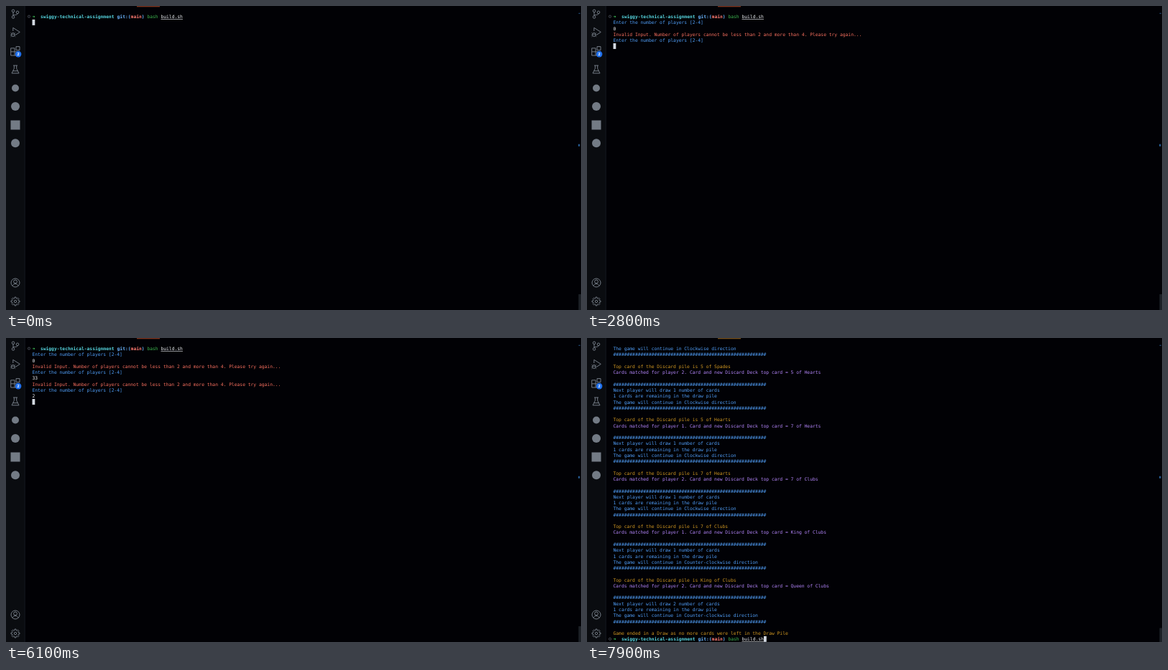
Recreate the animation shown at these times as an HTML page. Size 800x424 px, loop 8000 ms.

```html
<!DOCTYPE html>
<html lang="en">
<head>
<meta charset="utf-8">
<title>Card game in a terminal</title>
<style>
  html, body { margin: 0; width: 100%; height: 100%; overflow: hidden; background: #010105; }
  svg { display: block; width: 800px; height: 424px; }
  text { font: 6.325px "DejaVu Sans Mono", monospace; white-space: pre; text-rendering: geometricPrecision; }
  .blue { fill: #519ff8; }
  .red { fill: #f8705f; }
  .yellow { fill: #d29922; }
  .purple { fill: #b486fa; }
  .white { fill: #f0f3f6; }
  .green { fill: #3fb950; }
  .arrow { fill: #4ae168; font-weight: bold; }
  .path { fill: #56d4dd; font-weight: bold; }
  .git { fill: #6cb6ff; font-weight: bold; }
  .branch { fill: #ff7b72; font-weight: bold; }
  .icons { fill: none; stroke: #737b85; stroke-width: 1; stroke-linejoin: round; }
  .plain { fill: #737b85; stroke: none; }
</style>
</head>
<body>
<svg viewBox="0 0 800 424">
  <rect width="800" height="424" fill="#010105"/>
  <rect width="26" height="424" fill="#0a0c10"/>
  <path d="M26.2 0V424" stroke="#1b1f26" stroke-width=".8"/>
  <rect id="tab" x="182" width="32" height="1.3"/>

  <g class="icons">
    <circle cx="10" cy="6.8" r="1.8"/>
    <circle cx="10" cy="15.4" r="1.8"/>
    <circle cx="16" cy="8.8" r="1.8"/>
    <path d="M10 8.6V13.6M16 10.6C16 12.6 13 12.2 10 12.8"/>

    <path d="M9.8 35V30.3L19.3 36.4L13.2 40.4"/>
    <ellipse cx="9.8" cy="40" rx="2.1" ry="2.6"/>
    <path d="M7.7 39.3H11.9M6.4 37.3L8 38.6M13.2 37.3L11.6 38.6M6 40.5H7.7M11.9 40.5H13.6M6.4 43L8 41.8M13.2 43L11.6 41.8" stroke-width=".7"/>

    <path d="M6.7 58.8H12V69H6.7ZM6.7 63.8H17V69H12M14 56.6H19V61.6H14Z"/>

    <path d="M10 83H16M11.3 83V87.3L8 93.8H18L14.7 87.3V83M9.7 90.6H16.3"/>

    <circle cx="13" cy="386" r="6"/>
    <circle cx="13" cy="384.4" r="2.4"/>
    <path d="M9 390.4C10 386.6 16 386.6 17 390.4"/>

    <circle cx="13" cy="412" r="1.7"/>
    <path id="gear"/>

    <circle class="plain" cx="13" cy="114.5" r="5"/>
    <circle class="plain" cx="13" cy="140" r="6"/>
    <rect class="plain" x="6.5" y="159.5" width="13" height="13"/>
    <circle class="plain" cx="13" cy="191.3" r="6"/>
  </g>
  <circle cx="17.1" cy="67.1" r="4.3" fill="#1f6feb"/>
  <text x="17.1" y="69.2" fill="#fff" text-anchor="middle" style="font: bold 5.6px 'Liberation Sans', sans-serif">2</text>

  <rect x="796.5" y="9.8" width="2.5" height="1" fill="#24507f"/>
  <rect x="796.3" y="192.7" width="2" height="3" fill="#2b68a8"/>
  <rect id="slider" x="796.5" width="3.5" height="22" fill="#1c2026"/>

  <g id="screen"></g>
  <rect id="cursor" width="3.8" height="8" fill="#d3d9e2"/>
</svg>
<script>
const LOOP = 8000, LEFT = 36.5, TOP = 10.6, CHAR = 3.808, LINE = 8.27;
const $ = id => document.getElementById(id);

const row = (text, color) => [[text, color]];
const blank = [];
const ask = row('Enter the number of players [2-4]', 'blue');
const invalid = row('Invalid Input. Number of players cannot be less than 2 and more than 4. Please try again...', 'red');
const typed = text => row(text, 'white');
const hashes = row('#'.repeat(56), 'blue');
const direction = way => row(`The game will continue in ${way} direction`, 'blue');
const prompt = [['➜', 'arrow'], ['  ', ''], ['swiggy-technical-assignment', 'path'], [' ', ''],
  ['git:(', 'git'], ['main', 'branch'], [')', 'git'], [' ', '']];
const command = [...prompt, ['bash', 'green'], [' ', ''], ['build.sh', 'white', true]];

const turn = (top, player, next, draw, way) => [
  blank,
  row(`Top card of the Discard pile is ${top}`, 'yellow'),
  row(`Cards matched for player ${player}. Card and new Discard Deck top card = ${next}`, 'purple'),
  blank,
  hashes,
  row(`Next player will draw ${draw} number of cards`, 'blue'),
  row('1 cards are remaining in the draw pile', 'blue'),
  direction(way),
  hashes,
];

const start = [command, ask];
const retry = [...start, typed('0'), invalid, ask];
const lastTry = [...retry, typed('33'), invalid, ask];
const result = [
  direction('Clockwise'),
  hashes,
  ...turn('5 of Spades', 2, '5 of Hearts', 1, 'Clockwise'),
  ...turn('5 of Hearts', 1, '7 of Hearts', 1, 'Clockwise'),
  ...turn('7 of Hearts', 2, '7 of Clubs', 1, 'Clockwise'),
  ...turn('7 of Clubs', 1, 'King of Clubs', 1, 'Counter-clockwise'),
  ...turn('King of Clubs', 2, 'Queen of Clubs', 2, 'Counter-clockwise'),
  blank,
  row('Game ended in a Draw as no more cards were left in the Draw Pile', 'yellow'),
];

// Each state starts at its time; the cursor follows the last row.
const states = [
  [0, [command, blank]],
  [100, [...start, blank]],
  [2000, [...start, typed('0')]],
  [2500, [...retry, blank]],
  [3600, [...retry, typed('3')]],
  [3800, [...retry, typed('33')]],
  [4600, [...lastTry, blank]],
  [5500, [...lastTry, typed('2')]],
  [6060, [...lastTry, typed('2'), blank]],
  [6190, [...result, blank]],
  [6300, [...result, prompt]],
  [7100, [...result, command]],
];

function drawRow(spans, index) {
  const top = TOP + index * LINE;
  let x = LEFT, out = '';
  if (spans.length > 5)
    out += `<circle cx="32" cy="${top + 4}" r="1.6" fill="none" stroke="#6e7681" stroke-width=".6"/>`;
  for (const [text, color, underlined] of spans) {
    const width = text.length * CHAR;
    if (text.trim()) out += `<text class="${color}" x="${x}" y="${top + 6.5}">${text}</text>`;
    if (underlined)
      out += `<rect class="${color}" x="${x}" y="${top + 7.5}" width="${width}" height=".6"/>`;
    x += width;
  }
  return out;
}

function showState(rows) {
  const finished = rows.length > 20;
  const last = rows.length - 1;
  const columns = rows[last].reduce((sum, [text]) => sum + text.length, 0);
  $('screen').innerHTML = rows.map(drawRow).join('');
  $('cursor').setAttribute('x', LEFT + columns * CHAR);
  $('cursor').setAttribute('y', TOP + last * LINE);
  $('slider').setAttribute('y', finished ? 404.5 : 402);
  $('tab').setAttribute('fill', finished ? '#77521d' : '#80351f');
}

function gearPath() {
  const points = [];
  for (let tooth = 0; tooth < 8; tooth++)
    for (const [offset, radius] of [[-.26, 4.4], [-.17, 6], [.17, 6], [.26, 4.4]]) {
      const angle = tooth * Math.PI / 4 + offset;
      points.push(`${13 + radius * Math.cos(angle)} ${412 + radius * Math.sin(angle)}`);
    }
  return `M${points.join('L')}Z`;
}
$('gear').setAttribute('d', gearPath());

let shown;
function frame() {
  const time = performance.now() % LOOP;
  const state = states.findLast(([from]) => from <= time);
  if (state !== shown) showState((shown = state)[1]);
  requestAnimationFrame(frame);
}
frame();
</script>
</body>
</html>
```
